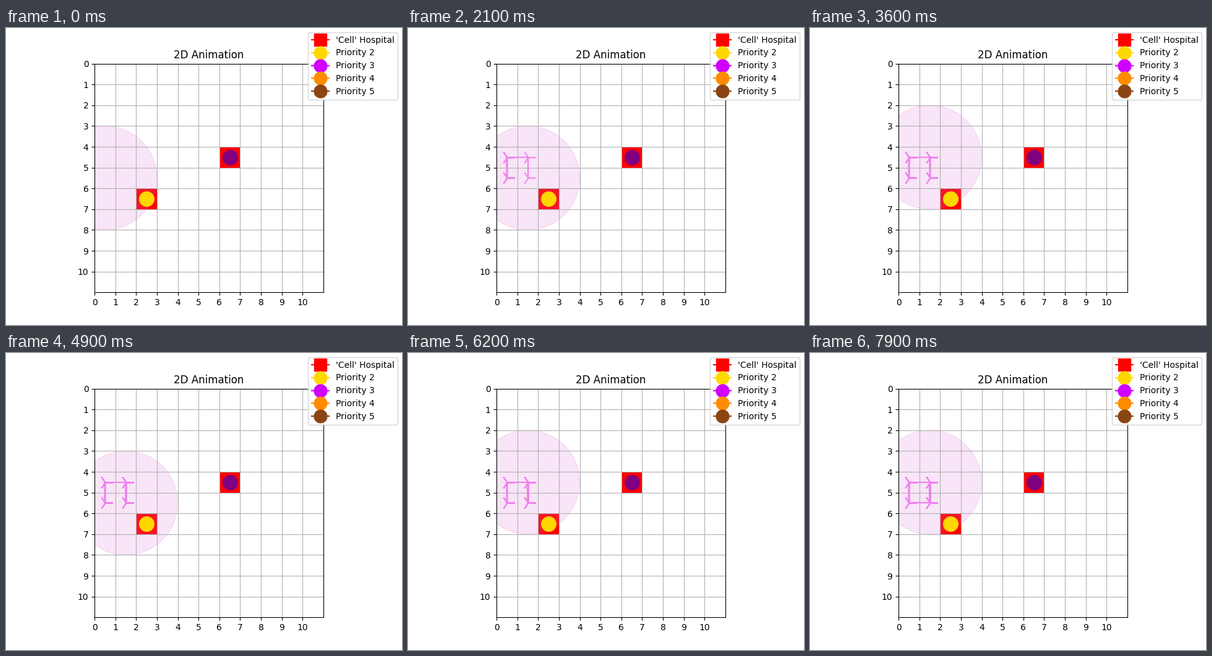
Recreate the animation shown at these times as a matplotlib script. Size 640 by 480 pixels, loop 8 s.

```python
import matplotlib.pyplot as plt
from matplotlib.animation import FuncAnimation
from matplotlib.lines import Line2D
from matplotlib.patches import Circle, Rectangle

SIZE = 11
FRAMES = 80
STEP_MS = 100
MARK = 17

# Moves of the agent, one per frame; S stands still.
MOVES = ("S" + "U" + "DU" * 7 + "SR" + "DU" * 23
         + "DL" + "UD" * 3 + "RU" + "DU" + "S" + "DU")
SHIFT = {"U": (0, -1), "D": (0, 1), "L": (-1, 0), "R": (1, 0), "S": (0, 0)}


def walk(start):
    path = [start]
    for move in MOVES:
        (x, y), (dx, dy) = path[-1], SHIFT[move]
        path.append((x + dx, y + dy))
    return path


def add_hospital(col, row, color):
    ax.add_patch(Rectangle((col, row), 1, 1, facecolor="red", edgecolor="none"))
    ax.plot(col + 0.5, row + 0.5, "o", color=color, markersize=MARK)


def legend_entry(label, color, marker="o"):
    return Line2D([0], [0], color=color, marker=marker, markersize=15, label=label)


path = walk((0.5, 5.5))

fig, ax = plt.subplots(figsize=(6.4, 4.8), dpi=100)
ax.set_aspect("equal")
ax.set_xlim(0, SIZE)
ax.set_ylim(SIZE, 0)
ax.set_xticks(range(SIZE))
ax.set_yticks(range(SIZE))
ax.grid(True)
ax.set_title("2D Animation")

add_hospital(2, 6, "gold")
add_hospital(6, 4, "purple")

sight = ax.add_patch(Circle(path[0], 2.5, color="orchid", alpha=0.18))

# Each move leaves its own line, so repeated passes grow heavier.
trail = [
    ax.plot([x0, x1], [y0, y1], color="violet", marker="4",
            markersize=MARK, visible=False)[0]
    for (x0, y0), (x1, y1) in zip(path, path[1:])
]

fig.legend(handles=[
    legend_entry("'Cell' Hospital", "red", "s"),
    legend_entry("Priority 2", "gold"),
    legend_entry("Priority 3", "#d000ff"),
    legend_entry("Priority 4", "darkorange"),
    legend_entry("Priority 5", "saddlebrown"),
])


def update(frame):
    sight.center = path[frame]
    for i, line in enumerate(trail):
        line.set_visible(i < frame)
    return [sight, *trail]


anim = FuncAnimation(fig, update, frames=FRAMES, interval=STEP_MS,
                     init_func=lambda: update(0), repeat=True, repeat_delay=0)
plt.show()
```
